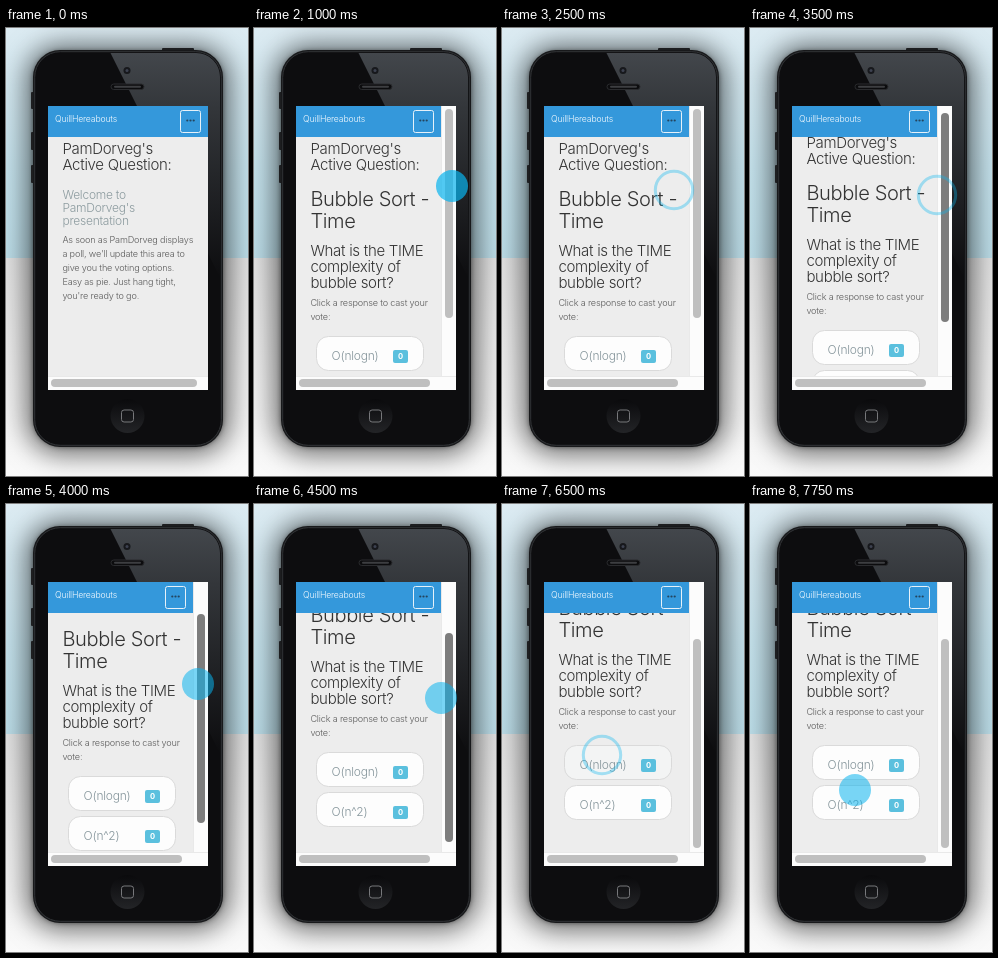
Recreate the animation shown at these times as an HTML page. Size 242 by 448 pixels, loop 8000 ms.

```html
<!DOCTYPE html>
<html lang="en">
<head>
<meta charset="utf-8">
<title>Phone poll</title>
<style>
  html, body { margin: 0; width: 100%; height: 100%; overflow: hidden; background: #f0f0f0; }
  #stage { position: relative; width: 242px; height: 448px; overflow: hidden;
    background: linear-gradient(#e2e2e2 230px, #fafafa 448px); }
  #sky { position: absolute; inset: 0 0 auto; height: 230px; background: linear-gradient(#dcebf2, #c5e2ec 60%, #bcdde8); }
  #shade { position: absolute; left: 28px; top: 24px; width: 188px; height: 394px; border-radius: 27px;
    box-shadow: 0 0 5px 1px rgba(0, 0, 0, .5), 0 1px 26px 8px rgba(0, 0, 0, .55); }
  svg { position: absolute; left: 0; top: 0; display: block; }
  text { font-family: Inter, "Liberation Sans", sans-serif; font-weight: 300; letter-spacing: -.02em; white-space: pre; }
  .h1 { font-size: 20.1px; fill: #333; }
  .h2 { font-size: 15px; fill: #333; }
  .h3 { font-size: 12px; fill: #8b9a9e; }
  .body { font-size: 9.15px; fill: #5c5c5c; }
  .choice { font-size: 12px; fill: #84949a; }
  .count { font-size: 7.6px; font-weight: 700; fill: #fff; text-anchor: middle; letter-spacing: 0; }
  .brand { font-size: 8.7px; fill: #f4faff; }
</style>
</head>
<body>
<div id="stage">
  <div id="sky"></div>
  <div id="shade"></div>
  <svg width="242" height="448" viewBox="0 0 242 448">
    <defs>
      <linearGradient id="glare" gradientUnits="userSpaceOnUse" x1="0" y1="24" x2="0" y2="250">
        <stop offset="0" stop-color="#43474c"/>
        <stop offset=".25" stop-color="#33363a"/>
        <stop offset="1" stop-color="#0d0d0f"/>
      </linearGradient>
      <linearGradient id="key" x2="0" y2="1">
        <stop offset="0" stop-color="#0a0a0c"/>
        <stop offset="1" stop-color="#232427"/>
      </linearGradient>
      <clipPath id="face"><rect x="30" y="25" width="184" height="391" rx="24"/></clipPath>
      <clipPath id="view"><rect x="42" y="109" width="160" height="239"/></clipPath>
    </defs>

    <g id="phone">
      <g fill="#1d1e20">
        <rect x="156" y="20" width="32" height="4" rx="1"/>
        <rect x="25" y="64" width="4" height="17" rx="1"/>
        <rect x="25" y="104" width="4" height="18" rx="1"/>
        <rect x="25" y="137" width="4" height="18" rx="1"/>
      </g>
      <rect x="27" y="22" width="190" height="397" rx="27" fill="#18191b"/>
      <rect x="28.7" y="23.7" width="186.6" height="393.6" rx="25.5" fill="#0d0d0f" stroke="#313336"/>
      <path clip-path="url(#face)" d="M104 24L131 78L214 250V24Z" fill="url(#glare)"/>
      <circle cx="121" cy="42.5" r="3.5" fill="#17181c"/>
      <circle cx="121" cy="42.5" r="1.5" fill="#3d4250"/>
      <rect x="105" y="56" width="33" height="5.5" rx="2.75" fill="#0c0c0e" stroke="#2a2b2e"/>
      <rect x="108" y="57.8" width="27" height="2" rx="1" fill="#3d3e41"/>
      <circle cx="121.5" cy="388" r="17" fill="url(#key)"/>
      <rect x="115.5" y="382" width="12" height="12" rx="2.6" fill="none" stroke="#77787b"/>
    </g>

    <rect x="42" y="78" width="160" height="284" fill="#fcfcfc"/>
    <rect id="paper" x="42" y="78" width="160" height="270" fill="#ededed"/>
    <g clip-path="url(#view)">
      <g id="waiting"></g>
      <g id="poll"></g>
    </g>

    <rect id="bar" x="42" y="78" width="160" height="31" fill="#3498db"/>
    <text class="brand" x="49" y="94">QuillHereabouts</text>
    <g id="menu">
      <rect x="174.5" y="82.5" width="20" height="22" rx="2" fill="none" stroke="#e6f1f9"/>
      <g fill="#24455e">
        <circle cx="181.3" cy="92.5" r="1.1"/>
        <circle cx="184.5" cy="92.5" r="1.1"/>
        <circle cx="187.7" cy="92.5" r="1.1"/>
      </g>
    </g>

    <path d="M42 348.5H202" stroke="#e9e9e9"/>
    <rect id="hThumb" x="45" y="351" width="146" height="8" rx="4" fill="#bfbfbf"/>
    <g id="vScroll">
      <path d="M187.5 78V348" stroke="#e9e9e9"/>
      <rect id="vThumb" x="191" y="81" width="8" height="209" rx="4"/>
    </g>
    <circle id="dot"/>
  </svg>
</div>
<script>
const NS = "http://www.w3.org/2000/svg";
const LOOP = 8000, STEP = 250, TINT = "#08b4ee";
const $ = id => document.getElementById(id);

function add(parent, tag, attrs, content) {
  const el = document.createElementNS(NS, tag);
  set(el, attrs);
  if (content) el.textContent = content;
  return parent.appendChild(el);
}

function set(el, attrs) {
  for (const k in attrs) el.setAttribute(k, attrs[k]);
}

function lines(parent, cls, y, gap, list) {
  list.forEach((s, i) => add(parent, "text", { class: cls, x: 56.4, y: y + i * gap }, s));
}

function option(parent, y, label) {
  const box = add(parent, "rect", { x: 62.5, y: y + .5, width: 107, height: 34, rx: 12, fill: "#fdfdfd", stroke: "#dadada" });
  add(parent, "text", { class: "choice", x: 77.6, y: y + 24 }, label);
  add(parent, "rect", { x: 139, y: y + 14, width: 15, height: 13, rx: 2, fill: "#5bc0de" });
  add(parent, "text", { class: "count", x: 146.5, y: y + 23.2 }, "0");
  return box;
}

const title = ["PamDorveg's", "Active Question:"];
const waiting = $("waiting"), poll = $("poll");

lines(waiting, "h2", 126, 16, title);
lines(waiting, "h3", 170.6, 13.2, ["Welcome to", "PamDorveg's", "presentation"]);
lines(waiting, "body", 215, 14, [
  "As soon as PamDorveg displays", "a poll, we'll update this area to",
  "give you the voting options.", "Easy as pie. Just hang tight,", "you're ready to go."
]);

lines(poll, "h2", 126, 16, title);
lines(poll, "h1", 178, 22, ["Bubble Sort -", "Time"]);
lines(poll, "h2", 228, 16, ["What is the TIME", "complexity of", "bubble sort?"]);
lines(poll, "body", 278, 14, ["Click a response to cast your", "vote:"]);
const first = option(poll, 308, "O(nlogn)");
option(poll, 348, "O(n^2)");

// [ms, x, y]
const path = [
  [750, 198, 158], [1000, 198, 158], [1500, 181, 152], [1750, 170, 150], [2250, 170, 160],
  [2500, 172, 162], [2750, 185, 168], [3000, 187, 168], [3500, 187, 167], [4000, 192, 180],
  [4500, 187, 194], [5000, 181, 205], [5500, 165, 212], [6000, 128, 233], [6500, 100, 251],
  [7250, 100, 251], [7500, 102, 268], [7750, 105, 286]
];
// [ms, offset]
const scroll = [[3250, 0], [3500, 6], [4000, 36], [4500, 60], [5000, 67]];
// [from, to] while the pointer is only an outline
const outline = [[1750, 3750], [6500, 7500]];

function at(table, t, col) {
  const i = table.findIndex(row => row[0] > t);
  if (i === 0) return table[0][col];
  if (i < 0) return table[table.length - 1][col];
  const a = table[i - 1], b = table[i];
  return a[col] + (b[col] - a[col]) * (t - a[0]) / (b[0] - a[0]);
}

const show = (el, on) => el.setAttribute("visibility", on ? "visible" : "hidden");
const within = (t, [from, to]) => t >= from && t < to;

function draw(now) {
  const t = Math.floor(now % LOOP / STEP) * STEP;
  const open = t >= 500;
  const offset = Math.round(at(scroll, t, 1));

  show(waiting, !open);
  show(poll, open);
  show($("vScroll"), open);
  set(poll, { transform: `translate(0 ${-offset})` });
  set($("bar"), { width: open ? 145 : 160 });
  set($("paper"), { width: open ? 145 : 160 });
  set($("menu"), { transform: `translate(${open ? -15 : 0} 0)` });
  set($("hThumb"), { width: open ? 131 : 146 });
  set($("vThumb"), {
    y: Math.floor(81 + offset * .81),
    fill: within(t, [3250, 5750]) ? "#7d7d7d" : "#bfbfbf"
  });
  set(first, { fill: within(t, [6250, 7500]) ? "#f3f4f4" : "#fdfdfd" });

  const ring = outline.some(span => within(t, span));
  const tap = t < 1500;
  show($("dot"), t >= 750);
  set($("dot"), {
    cx: at(path, t, 1), cy: at(path, t, 2), r: ring ? 18.7 : 16,
    fill: ring ? "none" : TINT, "fill-opacity": tap ? .7 : .54,
    stroke: ring ? TINT : "none", "stroke-width": 3, "stroke-opacity": .35
  });
}

const start = performance.now();
function tick() {
  draw(performance.now() - start);
  requestAnimationFrame(tick);
}
tick();
</script>
</body>
</html>
```
